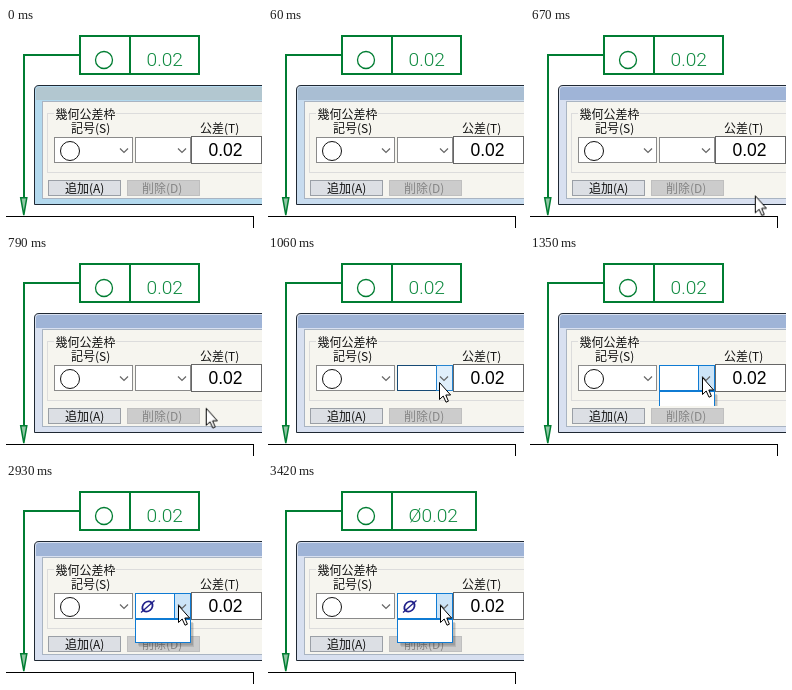
An HTML page that plays this animation: 256x200 px, repeating every 4050 ms.

```html
<!DOCTYPE html>
<html lang="ja">
<head>
<meta charset="utf-8">
<title>幾何公差枠</title>
<style>
html, body { margin: 0; width: 100%; height: 100%; overflow: hidden; background: #fff; }
svg { display: block; width: 100vw; height: 100vh; }
.ui { font: 12px "Noto Sans CJK JP", "Noto Sans CJK", sans-serif; fill: #111; }
.num { font: 17.5px "Liberation Sans", Arial, sans-serif; fill: #000; }
.cad { fill: none; stroke: #007d32; stroke-width: 2; }
.cad-text { font: 300 19.2px Roboto, "Liberation Sans", sans-serif; fill: #0f8a40; }
.chev { fill: none; stroke: #666; stroke-width: 1.2; }
.crisp { shape-rendering: crispEdges; }

.anim, .anim-step { animation: 4050ms linear infinite; }
.anim-step { animation-timing-function: step-end; }

#frame { animation-name: frame; }
@keyframes frame {
  0% { fill: #b3d9ee; }
  1.481% { fill: #c8dcef; }
  2.222%, 100% { fill: #d8e0f0; }
}
#title { animation-name: title; }
@keyframes title {
  0% { fill: #b2c7d0; }
  1.481% { fill: #a9bed3; }
  2.222%, 100% { fill: #9fb4d7; }
}

#cursor { animation-name: travel; }
@keyframes travel {
  0%, 13.579% { transform: translate(250px, 183px); visibility: hidden; }
  13.58% { transform: translate(250px, 183px); visibility: visible; }
  19.506% { transform: translate(200px, 152px); animation-timing-function: cubic-bezier(.2, .5, .5, 1); }
  26.173%, 28.642% { transform: translate(171px, 126px); }
  33%, 100% { transform: translate(172px, 121px); visibility: visible; }
}
#arrow { animation-name: tint; }
@keyframes tint {
  0% { fill: #111; }
  14.321%, 100% { fill: #fff; }
}

#hover { animation-name: hover; }
@keyframes hover {
  0% { opacity: 0; }
  23%, 100% { opacity: 1; }
}
#pressed { animation-name: pressed; }
@keyframes pressed {
  0% { opacity: 0; }
  30%, 100% { opacity: 1; }
}
#list { animation-name: unroll; }
@keyframes unroll {
  0%, 30.86% { clip-path: inset(0 0 100% 0); }
  35.556%, 100% { clip-path: inset(0 0 0 0); }
}
#mark { animation-name: mark; }
@keyframes mark {
  0% { opacity: 0; }
  41.235% { opacity: 1; }
  72.346%, 100% { opacity: 0; }
}
#choice { animation-name: choice; }
@keyframes choice {
  0% { opacity: 0; }
  72.346%, 100% { opacity: 1; }
}
#before { animation-name: before; }
@keyframes before {
  0% { opacity: 1; }
  78.025%, 100% { opacity: 0; }
}
#after { animation-name: after; }
@keyframes after {
  0% { opacity: 0; }
  78.025%, 100% { opacity: 1; }
}
</style>
</head>
<body>
<svg viewBox="0 0 256 200" preserveAspectRatio="none">
  <!-- drawing -->
  <path class="crisp" d="M0 188.5H247.5V200" fill="none" stroke="#000"/>
  <path class="cad crisp" d="M74 27H18V172M74 7V47M124 8V46"/>
  <path d="M14.7 169.8H20.8L17.8 187Z" fill="#8fc7a4" stroke="#007d32" stroke-width="1.5"/>
  <circle class="cad" cx="98" cy="32" r="8.5" style="stroke-width:1.3"/>
  <g id="before" class="anim-step">
    <path class="cad crisp" d="M74 8H193V46H74"/>
    <text class="cad-text" x="140.5" y="38">0.02</text>
  </g>
  <g id="after" class="anim-step">
    <path class="cad crisp" d="M74 8H208V46H74"/>
    <text class="cad-text" x="140.5" y="38">Ø0.02</text>
  </g>

  <!-- dialog -->
  <path id="frame" class="anim-step" d="M260 57.5H33Q28.5 57.5 28.5 62V176.5H260Z" stroke="#1f2833"/>
  <path id="title" class="anim-step" d="M260 59H33Q30 59 30 62V72H260Z"/>
  <path class="crisp" d="M36.5 170.5V73.5H260V170.5Z" fill="#f6f5ef" stroke="#a9b4c2"/>
  <path class="crisp" d="M48 85.5H41.5V144.5H260M110 85.5H260" fill="none" stroke="#dcdcdc"/>
  <g class="ui">
    <text x="49.5" y="90.5">幾何公差枠</text>
    <text x="65" y="104.5">記号(S)</text>
    <text x="194" y="104.5">公差(T)</text>
  </g>

  <g class="crisp" fill="#fff">
    <rect x="48.5" y="109.5" width="78" height="25" stroke="#8a8a8a"/>
    <rect x="129.5" y="109.5" width="55" height="25" stroke="#8a8a8a"/>
    <rect x="185.5" y="108.5" width="70" height="27" stroke="#666"/>
  </g>
  <circle cx="64" cy="123" r="9.5" fill="none" stroke="#111"/>
  <path class="chev" d="M114 120.5l4 4 4-4"/>
  <text class="num" x="202.5" y="128">0.02</text>

  <g class="crisp">
    <rect x="42.5" y="152.5" width="72" height="15" fill="#dcdfe4" stroke="#9a9fa6"/>
    <rect x="121.5" y="152.5" width="72" height="15" fill="#cccccc" stroke="#bfbfbf"/>
  </g>
  <g class="ui">
    <text x="59" y="164.5">追加(A)</text>
    <text x="136" y="164.5" style="fill:#858585">削除(D)</text>
  </g>

  <g id="hover" class="anim-step crisp">
    <rect x="129.5" y="109.5" width="55" height="25" fill="#fff" stroke="#174a75"/>
    <rect x="168.5" y="109.5" width="16" height="25" fill="#e0effb" stroke="#2684d0"/>
  </g>
  <g id="pressed" class="anim-step crisp">
    <rect x="129.5" y="109.5" width="55" height="25" fill="#fff" stroke="#0f7bd3"/>
    <rect x="168.5" y="109.5" width="16" height="25" fill="#cce4f7" stroke="#0f7bd3"/>
  </g>
  <path class="chev" d="M172 120.5l4 4 4-4"/>

  <g id="choice" class="anim-step" fill="none" stroke="#20208a">
    <ellipse cx="141.5" cy="122.5" rx="5" ry="5.2" stroke-width="1.8" transform="translate(26) skewX(-12)"/>
    <path d="M135 128.5L148.5 116.5" stroke-width="1.4"/>
  </g>

  <g id="list" class="anim">
    <path d="M133 139H188V163H133Z" fill="#000" opacity=".1"/>
    <path d="M132 138H187V161.5H132Z" fill="#000" opacity=".14"/>
    <rect class="crisp" x="129.5" y="135.5" width="55" height="23" fill="#fff" stroke="#0f7bd3"/>
  </g>
  <rect id="mark" class="anim-step crisp" x="130" y="136" width="54" height="22" fill="none" stroke="#e01b24" stroke-width="2"/>

  <g id="cursor" class="anim">
    <path id="arrow" class="anim-step" d="M.5 .5V17.5L4.2 14 7 20.2 9.4 19.2 6.8 13H11.6Z" stroke="#000"/>
  </g>
</svg>
</body>
</html>
```
